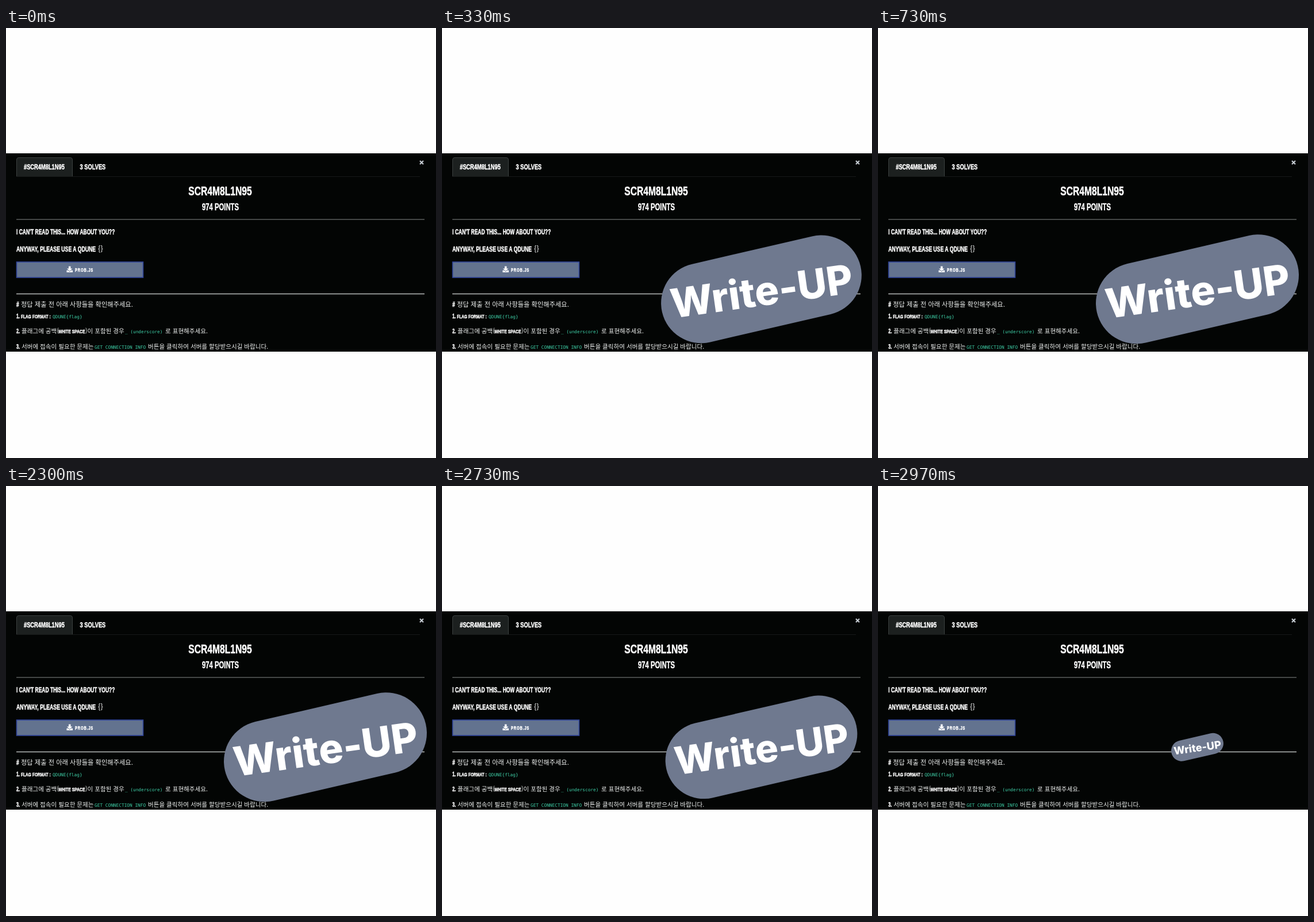
Animation, 748 px wide and 748 px high, one loop 3010 ms. Source, as an HTML page:

```html
<!DOCTYPE html>
<html lang="ko">
<head>
<meta charset="utf-8">
<title>Write-UP</title>
<style>
  html, body { margin: 0; width: 100%; height: 100%; overflow: hidden; background: #fefefe; }
  svg { display: block; width: 748px; height: 748px; }
  .display { font-family: "Liberation Sans", Arial, sans-serif; font-weight: 700; fill: #fff; stroke: #fff; stroke-width: .5px; }
  .korean { font-family: "Noto Sans CJK KR", "Noto Sans CJK", sans-serif; fill: #f2f4f3; }
  .code { font-family: "DejaVu Sans Mono", monospace; fill: #3fd0a8; }
  .badge { font: 800 71px Inter, sans-serif; fill: #fff; text-anchor: middle; }
</style>
</head>
<body>
<svg viewBox="0 0 748 748">
  <rect y="218" width="748" height="345" fill="#030504"/>
  <path d="M18 258.5H720" stroke="#171919"/>
  <path d="M18.5 258V229q0-3.5 3.5-3.5H112q3.5 0 3.5 3.5V258" fill="#1c201f" stroke="#3b4040"/>
  <path d="M18 333H728" stroke="#858988"/>
  <path d="M18 462.5H728" stroke="#b9bcbb" stroke-width="1.3"/>
  <path d="M720 231l6 6m0-6l-6 6" stroke="#c3cad0" stroke-width="2.2"/>
  <rect x="18.5" y="407" width="220" height="27" fill="#63738f" stroke="#30459c" stroke-width="1.6"/>
  <path d="M109 414.5h3.5v4h3l-4.75 4.5l-4.75-4.5h3zM105.5 421.500h2.500l2.750 2.500l2.750-2.500h2.500v3.500h-10.500z" fill="#fff"/>
  <g id="page"></g>
  <g id="badge">
    <path d="M-106 24.5L106-24.5" stroke="#6f798f" stroke-width="141" stroke-linecap="round"/>
    <text class="badge" transform="rotate(-8)" y="29">Write-UP</text>
  </g>
</svg>
<script>
  const LOOP = 3010, OUT_END = 2987, CONDENSED = 0.69;
  const page = document.getElementById('page');
  const badge = document.getElementById('badge');

  function write(kind, text, x, y, size, anchor = 'start', spacing = 0) {
    const node = document.createElementNS('http://www.w3.org/2000/svg', 'text');
    const squeeze = kind === 'display' ? CONDENSED : 1;
    node.setAttribute('class', kind);
    node.setAttribute('transform', `translate(${x} ${y}) scale(${squeeze} 1)`);
    node.setAttribute('font-size', size);
    node.setAttribute('text-anchor', anchor);
    node.setAttribute('letter-spacing', spacing);
    node.textContent = text;
    page.append(node);
  }
  const display = (...args) => write('display', ...args);
  const korean = (...args) => write('korean', ...args);
  const code = (...args) => write('code', ...args);

  display('#SCR4M8L1N95', 31, 245.5, 13.5);
  display('3 SOLVES', 128.5, 245.5, 13.5);
  display('SCR4M8L1N95', 372.5, 290.5, 22.7, 'middle');
  display('974 POINTS', 373, 316.5, 16.4, 'middle');
  display("I CAN'T READ THIS... HOW ABOUT YOU??", 18, 358.5, 12.3);
  display('ANYWAY, PLEASE USE A QDUNE', 18, 388.5, 12.6);
  korean('{}', 160, 388.5, 13);
  display('PROB.JS', 120, 423.5, 8.7, 'start', 1.2);

  display('#', 18, 485, 12);
  korean('정답 제출 전 아래 사항들을 확인해주세요.', 26, 485, 11.25);

  display('1.', 18, 504.5, 10.5);
  display('FLAG FORMAT :', 26, 504.5, 9.6);
  code('QDUNE{flag}', 81, 504.5, 7.8);

  display('2.', 18, 531, 10.5);
  korean('플래그에 공백(', 27, 531, 10.57);
  display('WHITE SPACE', 91, 531, 9.8);
  korean(')이 포함된 경우', 138, 531, 10.57);
  code('_ (underscore)', 207, 531, 7.75);
  korean('로 표현해주세요.', 277, 531, 10.57);

  display('3.', 18, 558, 10.5);
  korean('서버에 접속이 필요한 문제는', 27, 558, 10.57);
  code('GET CONNECTION INFO', 154, 558, 7.8);
  korean('버튼을 클릭하여 서버를 할당받으시길 바랍니다.', 247, 558, 10.57);

  // Damped swings: [time in ms, scale]
  const swings = [[132, 1.2], [250, 0.945], [385, 1.012], [520, 0.997], [700, 1]];

  function pop(t) {
    if (t <= 0) return 0;
    let [start, from] = swings[0];
    if (t < start) return from * (1 - (1 - t / start) ** 1.75);
    for (const [end, to] of swings.slice(1)) {
      if (t < end) return from + (to - from) * (1 - Math.cos(Math.PI * (t - start) / (end - start))) / 2;
      [start, from] = [end, to];
    }
    return 1;
  }

  function draw(now) {
    // Steps at 30 per second, on a 10 ms grid
    const step = Math.min(89, Math.floor((now % LOOP + 4) * 0.03));
    const t = Math.round(step * 10 / 3) * 10;
    const scale = pop(Math.min(t, OUT_END - t));
    badge.setAttribute('transform', `translate(555.5 454.3) scale(${scale})`);
    badge.setAttribute('visibility', scale ? 'visible' : 'hidden');
  }

  const begin = performance.now();
  function tick() {
    draw(performance.now() - begin);
    requestAnimationFrame(tick);
  }
  tick();
</script>
</body>
</html>
```
